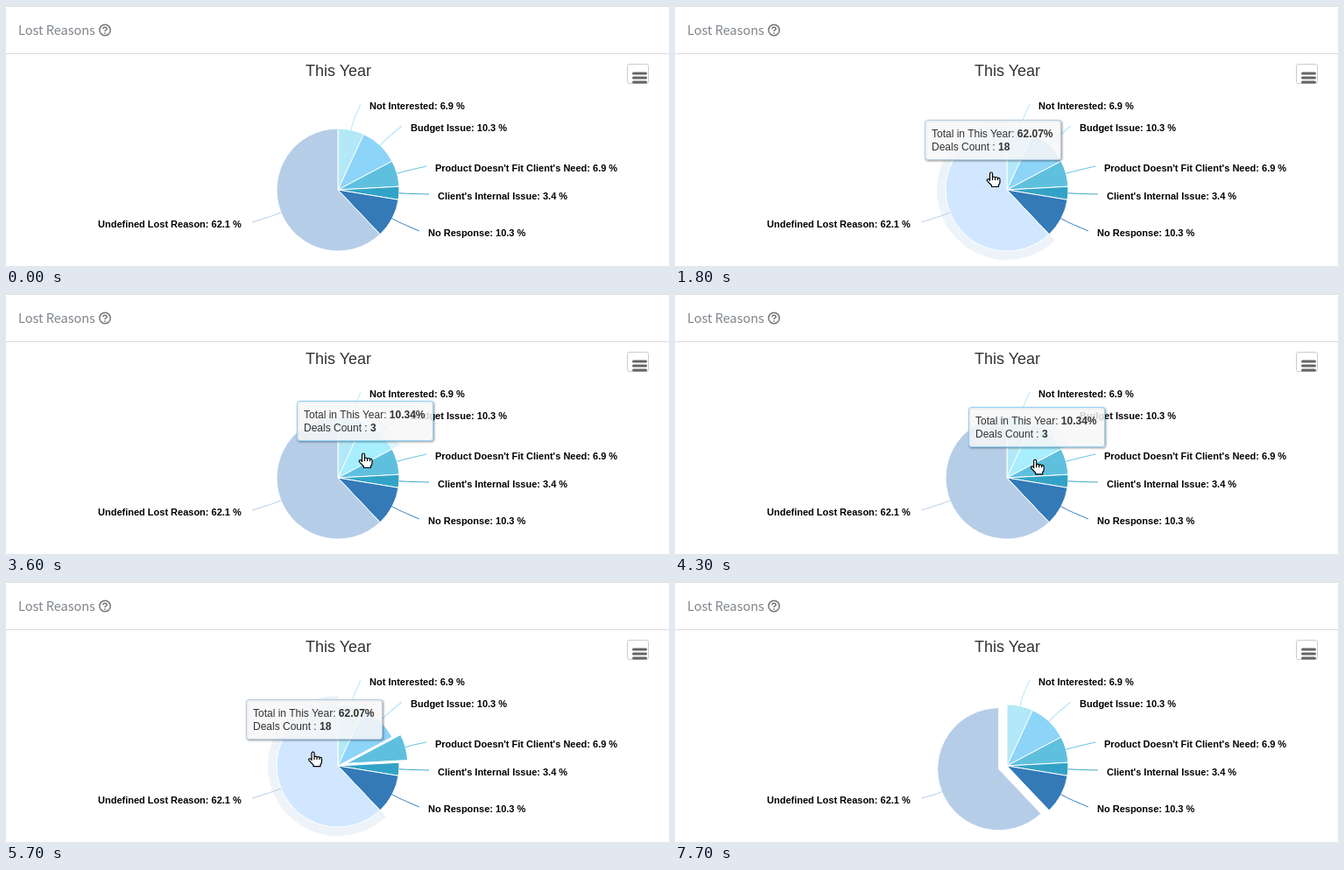
Recreate the animation shown at these times as an HTML page. Size 757 px wide and 297 px high, loop 7.8 s.

```html
<!DOCTYPE html>
<html lang="en">
<head>
<meta charset="utf-8">
<title>Lost Reasons</title>
<style>
  html, body { margin: 0; width: 100%; height: 100%; overflow: hidden; background: #fff; }
  svg { display: block; font-family: "Liberation Sans", Arial, sans-serif; }
  .head { font: 14.5px "Noto Sans CJK JP", "Noto Sans CJK SC", "Noto Sans CJK", Lato, sans-serif; fill: #7d838a; }
  .title { font-size: 18px; fill: #333; text-anchor: middle; }
  .label { font-size: 11px; font-weight: bold; stroke: #fff; stroke-width: 2px; paint-order: stroke; stroke-linejoin: round; }
  .tip { font-size: 12px; fill: #333; }
  .tip tspan { font-weight: bold; }
  .slice { stroke: #fff; stroke-width: 1; stroke-linejoin: round; }
  .link, .shade { fill: none; }
  .cursor { fill: #fff; stroke: #000; stroke-width: 1.2; stroke-linejoin: round; }
</style>
</head>
<body>
<svg id="stage" width="757" height="297" viewBox="0 0 757 297">
  <path d="M0 .5H757M0 54.5H757" stroke="#ddd"/>
  <text class="head" x="14" y="33">Lost Reasons</text>
  <circle cx="113" cy="27.5" r="6.2" fill="none" stroke="#777" stroke-width="1.5"/>
  <path d="M110.9 26.2Q111 24.2 113 24.2T115.1 26Q115.1 27 114 27.6T113 29.2M113 30.2V31.8" fill="none" stroke="#777" stroke-width="1.6"/>
  <text class="title" x="379.5" y="80">This Year</text>
  <rect x="709.5" y="66.5" width="24" height="22" rx="2" fill="#fff" stroke="#ccc"/>
  <path d="M716.5 77H730.5M716.5 82H730.5M716.5 87H730.5" stroke="#666" stroke-width="3" stroke-linecap="round"/>
  <path id="halo" fill-opacity=".25"/>
  <g id="pie"></g>
  <g id="links"></g>
  <g id="labels"></g>
  <g id="tip">
    <g class="shade" stroke="#000" transform="translate(1 1)">
      <rect rx="3" height="45" stroke-width="5" stroke-opacity=".05"/>
      <rect rx="3" height="45" stroke-width="3" stroke-opacity=".1"/>
      <rect rx="3" height="45" stroke-opacity=".15"/>
    </g>
    <rect id="box" rx="3" height="45" fill="#f7f7f7" fill-opacity=".85"/>
    <text class="tip" id="share" x="7.5" y="19.5">Total in This Year: <tspan></tspan></text>
    <text class="tip" id="count" x="7.5" y="34.5">Deals Count : <tspan></tspan></text>
  </g>
  <g id="cursor" class="cursor">
    <path id="arrow" d="M0 0V16.5L3.8 13L6.4 19.2L9.2 18L6.6 12H11.8Z"/>
    <path id="hand" d="M-1.5 9.5V1.5Q-1.5 0 0 0T1.5 1.5V6Q1.5 5 3 5T4.5 6.5Q4.5 5.5 6 5.5T7.5 7Q7.5 6.3 8.7 6.3T10 8V11.5Q10 13 8.5 14.5V16.5H.5V15L-4.5 9.8Q-5.3 8.3 -4 7.8T-1.5 9.5ZM1.5 6V9M4.5 6.5V9M7.5 7V9"/>
  </g>
</svg>
<script>
const LOOP = 7800, STEP = 100, CX = 379, CY = 210, R = 70;
const $ = id => document.getElementById(id);

// x, y: text position; lx, ly: label end of the connector
const slices = [
  { name: "Not Interested", n: 2, color: "#b2e8f7", x: 415, y: 118, lx: 405, ly: 112 },
  { name: "Budget Issue", n: 3, color: "#8dd4f9", x: 462, y: 143, lx: 452, ly: 137 },
  { name: "Product Doesn't Fit Client's Need", n: 2, color: "#5fc0de", x: 490, y: 189, lx: 480, ly: 183 },
  { name: "Client's Internal Issue", n: 1, color: "#32a3c6", x: 493, y: 221, lx: 483, ly: 215 },
  { name: "No Response", n: 3, color: "#337ab7", x: 482, y: 263, lx: 472, ly: 257 },
  { name: "Undefined Lost Reason", n: 18, color: "#b6cde8", x: 105, y: 253, lx: 281, ly: 247 }
];
const PRODUCT = 2, UNDEFINED = 5;
const total = slices.reduce((sum, s) => sum + s.n, 0);

// time, x, y of the pointer
const path = [
  [100, 190, 15], [600, 337, 205], [1500, 337, 205], [2100, 385, 175],
  [2900, 385, 175], [3600, 408, 182], [4000, 408, 182], [4800, 418, 205],
  [5100, 418, 205], [5900, 338, 192], [6000, 334.5, 174], [6200, 334.5, 174],
  [6300, 325, 155], [6400, 317, 143], [7500, 114, -7], [7600, 101, -11]
];

const clamp = v => Math.max(0, Math.min(1, v));
const polar = (a, r, cx = CX, cy = CY) => [cx + r * Math.sin(a), cy - r * Math.cos(a)];
const pt = p => p.map(v => v.toFixed(2)).join(" ");

function add(parent, tag, attrs) {
  const el = document.createElementNS("http://www.w3.org/2000/svg", tag);
  for (const k in attrs) el.setAttribute(k, attrs[k]);
  return $(parent).appendChild(el);
}

function brighten(hex) {
  const parts = hex.match(/\w\w/g).map(h => Math.min(255, parseInt(h, 16) + 26));
  return `rgb(${parts})`;
}

function ring(s, inner, outer) {
  const big = s.to - s.from > Math.PI ? 1 : 0;
  return `M${pt(polar(s.from, outer))}A${outer} ${outer} 0 ${big} 1 ${pt(polar(s.to, outer))}` +
    `L${pt(polar(s.to, inner))}` +
    (inner ? `A${inner} ${inner} 0 ${big} 0 ${pt(polar(s.from, inner))}` : "") + "Z";
}

let sum = 0;
for (const s of slices) {
  s.from = sum / total * 2 * Math.PI;
  sum += s.n;
  s.to = sum / total * 2 * Math.PI;
  s.mid = (s.from + s.to) / 2;
  s.shape = add("pie", "path", { class: "slice", d: ring(s, 0, R) });
  s.link = add("links", "path", { class: "link", stroke: s.color });
  const text = add("labels", "text", { class: "label", x: s.x, y: s.y });
  text.textContent = `${s.name}: ${(s.n / total * 100).toFixed(1)} %`;
}

function pointer(t) {
  if (t < path[0][0] || t > path[path.length - 1][0]) return null;
  const i = Math.max(1, path.findIndex(k => k[0] >= t));
  const [t0, x0, y0] = path[i - 1], [t1, x1, y1] = path[i];
  let u = (t - t0) / (t1 - t0);
  if (t < 6200) u = u * u * (3 - 2 * u);
  return [x0 + (x1 - x0) * u, y0 + (y1 - y0) * u];
}

// how far a clicked slice is pulled out, 0 to 1
function pull(i, t) {
  const swap = clamp((t - 5900) / 200);
  if (i === PRODUCT) return clamp((t - 4800) / 200) - swap;
  return i === UNDEFINED ? swap : 0;
}

const centre = (i, t) => polar(slices[i].mid, 10 * pull(i, t));

function hit(p, t) {
  return slices.findIndex((s, i) => {
    const [cx, cy] = centre(i, t), dx = p[0] - cx, dy = p[1] - cy;
    const a = (Math.atan2(dx, -dy) + 2 * Math.PI) % (2 * Math.PI);
    return Math.hypot(dx, dy) <= R && a >= s.from && a < s.to;
  });
}

// the tooltip stays where the pointer last touched a slice, then fades
const states = [];
let last = null;
for (let t = 0; t < LOOP; t += STEP) {
  const p = pointer(t), over = p ? hit(p, t) : -1;
  if (over >= 0) last = { t, p, i: over };
  const fade = last ? clamp(1 - (t - last.t - 500) / 200) : 0;
  states.push({ t, p, over, last, fade });
}

function drawTip({ last, fade }) {
  $("tip").setAttribute("opacity", fade);
  if (!last) return;
  const s = slices[last.i];
  $("share").lastChild.textContent = +(s.n / total * 100).toFixed(2) + "%";
  $("count").lastChild.textContent = s.n;
  const w = Math.round($("share").getComputedTextLength() + 16);
  document.querySelectorAll("#tip rect").forEach(r => r.setAttribute("width", w));
  $("box").setAttribute("stroke", s.color);
  const x = Math.round(last.p[0] + 1 - w / 2) + .5, y = Math.round(last.p[1] - 60) + .5;
  $("tip").setAttribute("transform", `translate(${x} ${y})`);
}

function draw(state) {
  const { t, p, over } = state;
  slices.forEach((s, i) => {
    const [cx, cy] = centre(i, t);
    const at = r => pt(polar(s.mid, r, cx, cy));
    s.shape.setAttribute("transform", `translate(${cx - CX} ${cy - CY})`);
    s.shape.setAttribute("fill", i === over ? brighten(s.color) : s.color);
    s.link.setAttribute("d", `M${s.lx} ${s.ly}C${s.lx} ${s.ly} ${at(82)} ${at(76)}L${at(R)}`);
  });

  const glow = over >= 0 && t < 5900 && !pull(over, t);
  $("halo").setAttribute("d", glow ? ring(slices[over], R, R + 10) : "");
  if (glow) $("halo").setAttribute("fill", slices[over].color);

  drawTip(state);

  $("cursor").setAttribute("visibility", p ? "visible" : "hidden");
  if (p) $("cursor").setAttribute("transform", `translate(${p[0]} ${p[1]})`);
  $("arrow").setAttribute("display", over < 0 ? "inline" : "none");
  $("hand").setAttribute("display", over < 0 ? "none" : "inline");
}

const start = performance.now();
function tick() {
  const t = Math.max(0, performance.now() - start) % LOOP;
  draw(states[Math.floor(t / STEP)]);
  requestAnimationFrame(tick);
}
tick();
</script>
</body>
</html>
```
